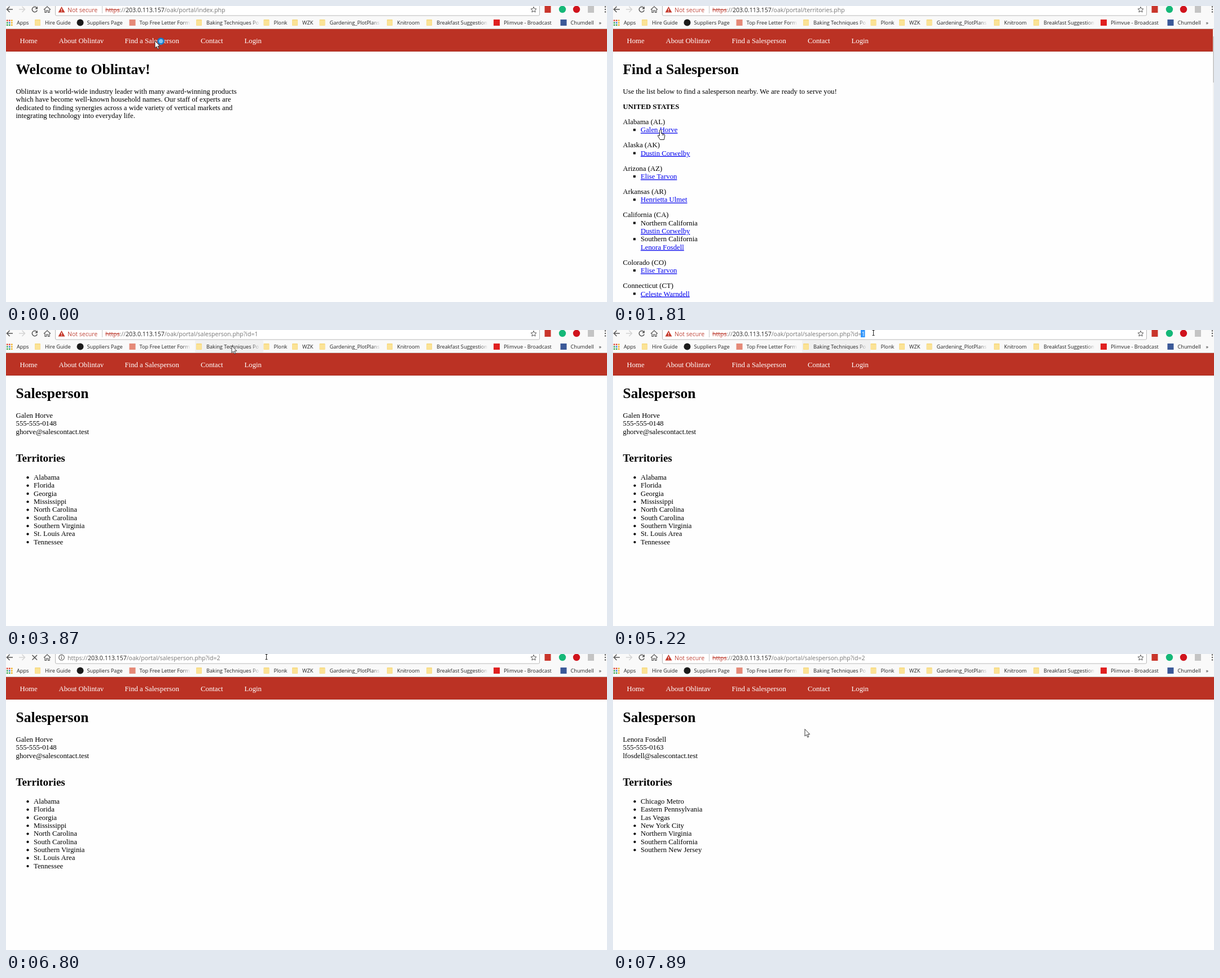
Write an HTML page that moves like this. It is 1065x526 px and loops after 8 s.

```html
<!DOCTYPE html>
<html lang="en">
<head>
<meta charset="utf-8">
<title>Sales site</title>
<style>
html, body { margin: 0; width: 100%; height: 100%; overflow: hidden; background: #fff }
svg { display: block }
text { white-space: pre; font: 12.75px "Liberation Serif", "Times New Roman", serif; fill: #000 }
.h1 { font-size: 25.5px; font-weight: bold }
.h2 { font-size: 19.1px; font-weight: bold }
.b { font-weight: bold }
.nav { fill: #fff }
.link { fill: #00e; text-decoration: underline }
.ui { font: 9.2px "Open Sans", sans-serif; fill: #222 }
.fade { fill: url(#fade) }
.url { font: 10.55px "Open Sans", sans-serif; fill: #777 }
.host { fill: #222 }
.warn { fill: #c0473b }
.struck { fill: #c0473b; text-decoration: line-through }
.pick { font-weight: bold; fill: #fff }
.line { fill: none; stroke: #555; stroke-width: 1.5 }
</style>
</head>
<body>
<svg width="1065" height="526" viewBox="0 0 1065 526">
  <defs><linearGradient id="fade">
    <stop offset=".84" stop-color="#222"/><stop offset="1" stop-color="#222" stop-opacity=".1"/>
  </linearGradient></defs>
  <g id="stage"></g>
</svg>
<script>
const LOOP = 8000, LINE = 14.35, RED = '#bb3224', BAR = '#f9f9f9';
const HOST = '203.0.113.157', DIR = '/oak/portal/';
const stage = document.getElementById('stage');

const text = (x, y, s, cls = '') => `<text x="${x}" y="${y}" class="${cls}">${s}</text>`;
const span = (s, cls) => `<tspan class="${cls}">${s}</tspan>`;
const rect = (x, y, w, h, fill, more = '') => `<rect x="${x}" y="${y}" width="${w}" height="${h}" fill="${fill}" ${more}/>`;
const dot = (x, y, r, fill, more = '') => `<circle cx="${x}" cy="${y}" r="${r}" fill="${fill}" ${more}/>`;
const line = (d, more = '') => `<path d="${d}" class="line" ${more}/>`;
const lines = (x, y, list) => list.map((s, i) => text(x, y + i * LINE, s)).join('');
const within = (t, a, b) => t >= a && t < b;

// ---- pages
const welcome = text(17.5, 121, 'Welcome to Oblintav!', 'h1') + lines(17.5, 156, [
  'Oblintav is a world-wide industry leader with many award-winning products',
  'which have become well-known household names. Our staff of experts are',
  'dedicated to finding synergies across a wide variety of vertical markets and',
  'integrating technology into everyday life.']);

// "Area>Person" puts an area line above the person's link
const STATES = [
  ['Alabama (AL)', 'Galen Horve'],
  ['Alaska (AK)', 'Dustin Corwelby'],
  ['Arizona (AZ)', 'Elise Tarvon'],
  ['Arkansas (AR)', 'Henrietta Ulmet'],
  ['California (CA)', 'Northern California>Dustin Corwelby', 'Southern California>Lenora Fosdell'],
  ['Colorado (CO)', 'Elise Tarvon'],
  ['Connecticut (CT)', 'Celeste Warndell']];

function territories() {
  let y = 210, out = text(17.5, 121, 'Find a Salesperson', 'h1')
    + text(17.5, 156, 'Use the list below to find a salesperson nearby. We are ready to serve you!')
    + text(17.5, 182.5, 'UNITED STATES', 'b');
  for (const [state, ...people] of STATES) {
    out += text(17.5, y, state);
    for (const entry of people) {
      const parts = entry.split('>');
      out += rect(36, y + LINE - 6.2, 4, 4, '#000');
      parts.forEach((s, i) => out += text(49, y += LINE, s, i == parts.length - 1 ? 'link' : ''));
    }
    y += 27;
  }
  return out + rect(1063, 41, 2, 485, '#f1f1f1') + rect(1063.5, 54, 1.5, 82, '#c1c1c1');
}

const person = (details, areas) => text(17.5, 121, 'Salesperson', 'h1') + lines(17.5, 156, details)
  + text(17.5, 234, 'Territories', 'h2') + lines(49, 266, areas)
  + areas.map((_, i) => dot(38.5, 262.2 + i * LINE, 2.1, '#000')).join('');

const PAGES = [welcome, territories(),
  person(['Galen Horve', '555-555-0148', 'ghorve@salescontact.test'],
    ['Alabama', 'Florida', 'Georgia', 'Mississippi', 'North Carolina', 'South Carolina',
      'Southern Virginia', 'St. Louis Area', 'Tennessee']),
  person(['Lenora Fosdell', '555-555-0163', 'lfosdell@salescontact.test'],
    ['Chicago Metro', 'Eastern Pennsylvania', 'Las Vegas', 'New York City', 'Northern Virginia',
      'Southern California', 'Southern New Jersey'])];

const nav = rect(0, 41, 1065, 40, RED) + rect(0, 80, 1065, 1, '#a93024')
  + [[24.5, 'Home'], [93.5, 'About Oblintav'], [210.5, 'Find a Salesperson'], [345, 'Contact'], [422.5, 'Login']]
    .map(([x, s]) => text(x, 66, s, 'nav')).join('');

// ---- browser bars
const folder = x => rect(x - 18, 24, 10, 11, '#f6d77c', 'rx="1"') + rect(x - 17.5, 25.5, 9, 9, '#fbe396');
const round = fill => x => dot(x - 12, 29.5, 6, fill);
const square = fill => x => rect(x - 18, 24, 11, 11, fill);

const BOOKMARKS = [
  [69, 'Hire Guide', folder], [143.5, 'Suppliers Page', round('#1b1b1b')],
  [236.5, 'Top Free Letter Form', square('#e58a78'), 'fade'], [355, 'Baking Techniques Po', folder, 'fade'],
  [474.5, 'Plonk', folder], [525, 'WZK', folder], [573.5, 'Gardening_PlotPlans', folder, 'fade'],
  [693, 'Knitroom', folder], [763, 'Breakfast Suggestion', folder, 'fade'],
  [882, 'Plimvue - Broadcast', square('#e02020')], [1000.5, 'Chumdell', square('#3b5998')]];

const APP_COLOURS = ['#e04a3a', '#e04a3a', '#f0b429', '#3aa757', '#3b7de0', '#f0b429', '#3aa757', '#3aa757', '#f0b429'];
const appGrid = APP_COLOURS.map((c, i) => rect(1 + i % 3 * 4, 24.5 + (i / 3 | 0) * 4, 2.6, 2.6, c)).join('');

const bookmarks = hover => rect(0, 18, 1065, 22, BAR) + (hover ? rect(335, 18, 121, 22, '#f0f0f0', 'rx="2"') : '')
  + appGrid + text(19, 32.7, 'Apps', 'ui')
  + BOOKMARKS.map(([x, s, icon, cls = '']) => icon(x) + text(x, 32.7, s, 'ui ' + cls)).join('')
  + text(1050.5, 33, '»', 'ui b') + rect(0, 40, 1065, 1, '#cfc8c7');

const toolbar = rect(0, 0, 1065, 18, BAR)
  + line('M12 6H2M6.500 1L1.500 6L6.500 11')
  + line('M23 6H33M28.500 1L33.500 6L28.500 11', 'style="stroke:#d4d4d4"')
  + line('M67 6.500L73 1L79 6.500M69 6V11.500H71.500V8H74.500V11.500H77V6', 'style="stroke-width:1.2"')
  + rect(87.5, -5, 858, 22, '#fff', 'stroke="#b8b8b8" rx="2"')
  + rect(954.5, 0, 11, 12, '#c9352b') + dot(986, 6, 6.2, '#15b878')
  + dot(1011, 6, 6.2, '#d0131c') + rect(1031, 0, 11, 12, '#c4c4c4')
  + [1.5, 6, 10.5].map(y => dot(1062, y, 1.2, '#555')).join('');

const reload = line('M54.500 3.200A4.600 4.600 0 1 0 55.300 7.500') + '<path d="M56 .8V5.500H51.300Z" fill="#555"/>';
const stop = line('M46.500 2L55 10.500M55 2L46.500 10.500');
const star = line('M935 1.500L936.400 4.800L940 5.100L937.300 7.500L938.100 11L935 9.100L931.900 11L932.700 7.500L930 5.100L933.600 4.800Z', 'style="stroke-width:1"');
const warning = '<path d="M98.500 1L104.500 11.500H92.500Z" fill="#c5392b"/>' + rect(97.9, 4.5, 1.2, 3.6, '#fff') + rect(97.9, 9, 1.2, 1.2, '#fff');
const info = dot(98.5, 6.2, 4.8, 'none', 'stroke="#555" stroke-width="1.1"') + rect(97.9, 5.5, 1.2, 3.5, '#555') + rect(97.9, 3.2, 1.2, 1.3, '#555');
const sheet = y => `<path d="M95.500 ${y}H99.500L102 ${y + 2.5}V${y + 9}H95.500Z" fill="none" stroke="currentColor"/>`;

function address(t, file) {
  const tail = DIR + file;
  if (within(t, 6110, 7070)) {
    const typing = t < 6550;
    return (t < 6800 ? `<g color="#666">${sheet(1.5)}</g>` : info)
      + text(109, 10.5, 'https://' + span(HOST, 'host') + tail, 'url')
      + (typing ? rect(379, 0, 1, 12, '#222') : '');
  }
  const selected = within(t, 4830, 6110);
  return warning + text(109, 10.5, 'Not secure', 'url warn') + rect(170, 0, 1, 13, '#c8c8c8')
    + (selected ? rect(439, 0, 7.5, 13, '#3297fd') : '')
    + text(176, 10.5, span('https', 'struck') + '://' + span(HOST, 'host')
      + (selected ? tail.slice(0, -1) + span(tail.slice(-1), 'nav') : tail), 'url');
}

function suggestions(file) {
  const full = 'https://' + HOST + DIR + file;
  return rect(0, 18, 1065, 49, '#fff') + rect(0, 66.5, 1065, .5, '#d8c4c1')
    + rect(87, 24, 859, 19.5, '#3498fd', 'rx="2"')
    + `<g color="#fff">${sheet(29)}</g>` + text(109, 37.5, full, 'url pick')
    + dot(97.5, 52, 3.2, 'none', 'stroke="#555" stroke-width="1.2"') + line('M100 54.500L103 57.500')
    + text(109, 57.3, span(full, 'host') + ' - Zovint Search', 'url');
}

// ---- pointer
const SHAPES = {
  arrow: '<path d="M0 0V12.500L2.900 9.900L4.900 14.500L6.900 13.600L4.900 9.200H8.800Z" fill="#fff" stroke="#222" stroke-width=".9"/>',
  hand: '<path d="M-1.500 1.200Q0-1.200 1.500 1.200V7L6 8Q8 8.500 7.800 11L6.500 18H-.5L-4.500 11.500Q-4.500 9.500-2.700 10.300L-1.500 11.300Z" fill="#fff" stroke="#222"/><path d="M3.500 8V11M5.500 8.500V11" stroke="#222" stroke-width=".7"/>',
  beam: '<path d="M-2-5H2M0-5V4M-2 4H2" fill="none" stroke="#222"/>'
};
SHAPES.busy = SHAPES.arrow + dot(10.5, .5, 5, '#7fc4f4', 'stroke="#1679c8" stroke-width="2.6"');

const POINTER = [
  [0, 264, 62, 'busy'], [980, 264, 62, 'arrow'],
  [1390, 225, 98, 'arrow'], [1530, 150, 165, 'arrow'], [1670, 82, 218, 'hand'], [1810, 84, 219.5, 'hand'], [2070, 85.5, 219.5, 'hand'],
  [3140, 105, 205, 'arrow'], [3281, 165, 168, 'arrow'], [3423, 245, 120, 'arrow'], [3564, 315, 80, 'arrow'],
  [3706, 365, 52, 'arrow'], [3847, 400, 28, 'arrow'], [3989, 432, 9, 'beam'], [4130, 443, 5, 'beam'],
  [4250, 442, 5, 'beam'], [4390, 443, 5, 'beam'], [4530, 444, 5, 'beam'],
  [4830, 448, 6, 'beam'], [4960, 454, 6, 'beam'], [5090, 459, 5, 'beam'], [5220, 461.5, 5.5, 'beam'],
  [7620, 300, 130, 'arrow'], [7755, 149, 244, 'arrow'], [7890, 340, 133.5, 'arrow']];

function pointer(t) {
  const [, x, y, shape] = POINTER.findLast(k => k[0] <= t);
  return `<g transform="translate(${x} ${y})">${SHAPES[shape]}</g>`;
}

// ---- whole picture at time t
function picture(t) {
  const page = t < 980 ? 0 : t < 2770 ? 1 : t < 7200 ? 2 : 3;
  const file = t < 430 ? 'index.php' : t < 2570 ? 'territories.php' : 'salesperson.php?id=' + (t < 6110 ? 1 : 2);
  const loading = within(t, 150, 980) || within(t, 2370, 2770) || within(t, 6800, 7330);
  const typing = within(t, 6110, 6550);
  return rect(0, 0, 1065, 526, '#fefefe') + nav + PAGES[page] + toolbar
    + (loading ? stop : reload) + address(t, file) + (typing ? '' : star)
    + (typing ? suggestions(file) : bookmarks(within(t, 3847, 6110))) + pointer(t);
}

let shown = '';
function tick() {
  const next = picture(performance.now() % LOOP);
  if (next !== shown) stage.innerHTML = shown = next;
  requestAnimationFrame(tick);
}
tick();
</script>
</body>
</html>
```
